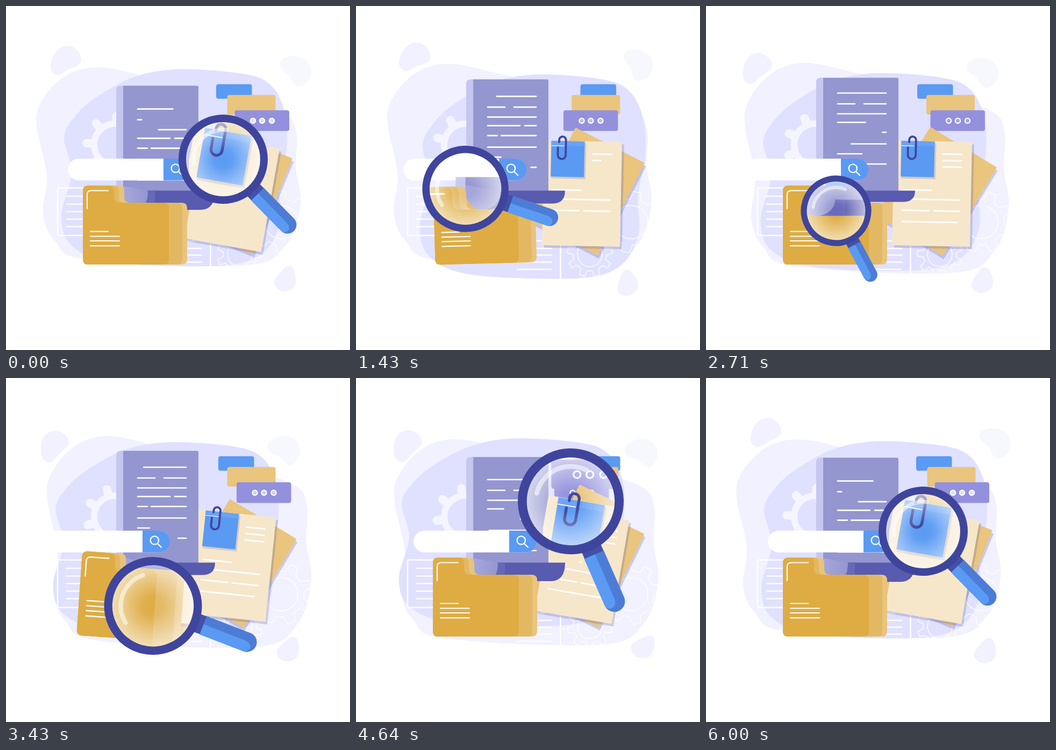
An HTML page for the animation above (6.07 s loop, 640x640 px).

```html
<!DOCTYPE html>
<html lang="en">
<head>
<meta charset="utf-8">
<title>Document search</title>
<style>
html, body { margin: 0; height: 100%; overflow: hidden; background: #fff; }
svg { display: block; width: 100vw; height: 100vh; }
.pen { fill: none; stroke: #fff; stroke-linecap: round; stroke-linejoin: round; }
</style>
</head>
<body>
<svg viewBox="0 0 640 640">
  <defs>
    <clipPath id="lens"><circle id="lensHole"/></clipPath>
    <radialGradient id="haze">
      <stop offset="0" stop-color="#fff" stop-opacity="0"/>
      <stop offset=".25" stop-color="#fff" stop-opacity=".04"/>
      <stop offset="1" stop-color="#fff" stop-opacity=".6"/>
    </radialGradient>
    <linearGradient id="rollFill">
      <stop offset="0" stop-color="#a5a7dc"/><stop offset="1" stop-color="#9496d0"/>
    </linearGradient>
  </defs>

  <path id="pale" fill="#f1f1ff"/>
  <path id="tint" fill="#e0e1ff"/>
  <path id="dropA" fill="#f1f1ff" d="M-16 27C-32 23-28 5-26 0C-20-19-8-27 3-27C18-27 30-13 29 0C28 10 13 13 3 18C-4 21-9 28-16 27Z"/>
  <path id="dropB" fill="#f6f8fd" d="M-30-12C-28-26-13-28-1-28C19-27 29-14 29 0C29 16 15 28 7 28C-3 27-5 16-11 9C-19 2-31-2-30-12Z"/>
  <path id="dropC" fill="#f1f1ff" d="M-21 4C-22-5-7-13 0-17C8-23 18-25 21-15C23-5 22 10 13 18C3 24-17 24-21 4Z"/>

  <g class="pen" stroke-width="2.6" opacity=".95">
    <path d="M200 338.500H98Q96 338.500 96 341V424Q96 427 99 427H200M113 354H160M113 368.500H160M113 382.500H160M113 396.500H160M113 410.500H160"/>
    <path d="M380.500 400V509M300 437H351M300 451H364M300 463.500H364M300 476.500H364M300 490H363"/>
  </g>
  <g id="gearA" fill="none" stroke="#f5f5ff" stroke-linecap="round"><circle r="39" stroke-width="12"/></g>
  <g class="pen" stroke-width="2" opacity=".7">
    <g id="gearB"><circle r="31"/></g>
    <g id="gearC"><circle r="23"/></g>
  </g>

  <g id="scene">
    <rect id="cardA" y="145.500" width="66.500" height="27" rx="4" fill="#5a9af3"/>
    <rect id="cardB" y="165.500" width="90" height="36.500" rx="4" fill="#e9c57d"/>
    <g id="cardC">
      <rect y="194" width="101.500" height="38.500" rx="4" fill="#9391dd"/>
      <g id="dots" fill="#fff" stroke="#fff" stroke-width="2.200">
        <circle cx="34" cy="213.500" r="4.600"/><circle cx="51" cy="213.500" r="4.600"/><circle cx="69" cy="213.500" r="4.600"/>
      </g>
    </g>

    <g id="backSheet">
      <rect x="-68" y="-92" width="145" height="193" rx="2" fill="#6667b5" opacity=".28"/>
      <rect x="-72.500" y="-96.500" width="145" height="193" rx="2" fill="#e9c57d"/>
    </g>
    <g id="sheet">
      <rect x="-68.500" y="-93" width="145" height="195" rx="1" fill="#6667b5" opacity=".28"/>
      <rect x="-72.500" y="-97.500" width="145" height="195" rx="1" fill="#f6e7cb"/>
      <rect x="-58" y="-94" width="64" height="67" fill="#8a83a8" opacity=".3"/>
      <rect x="-59" y="-97" width="62" height="66.500" rx="1" fill="#5a9af3"/>
      <rect x="-59" y="-97" width="62" height="9" fill="#6aa3f5"/>
      <path class="pen" d="M-58-88H-35" stroke-width="1.200"/>
      <path d="M-46.500-85V-71A7.300 7.300 0 0 0-31.800-71V-99A6.300 6.300 0 0 0-44.400-99V-95" fill="none" stroke="#3f459d" stroke-width="3.800" stroke-linecap="round"/>
      <g id="sheetLines" class="pen" stroke-width="2.700"></g>
    </g>

    <path id="strip" fill="#c6c7ef"/>
    <path id="page" fill="#9496d0"/>
    <g id="pageLines" class="pen" stroke-width="2.700"></g>
    <path id="roll" fill="#595bb0"/>
    <path id="rollShade" fill="#6668ba"/>
    <path id="curl" fill="url(#rollFill)"/>

    <g id="bar">
      <rect x="76" y="284" width="229" height="40.500" rx="20.200" fill="#fff"/>
      <path d="M254 284H285A20.200 20.200 0 0 1 285 324.500H254Z" fill="#5a9af3"/>
      <g class="pen" stroke-width="2.300"><circle cx="276.300" cy="302" r="7.700"/><path d="M282 308L289 315"/></g>
    </g>

    <g id="folder">
      <g id="folds"></g>
      <path class="pen" stroke-width="2.200" d="M151 377V351Q151 343.500 158 343.500H190M157 419.500H190M157 428.500H211M157 437H211M157 446.200H211"/>
    </g>
  </g>

  <g clip-path="url(#lens)"><use id="zoom" href="#scene"/></g>
  <g id="glass">
    <circle r="84" fill="url(#haze)"/>
    <path id="shine" class="pen" stroke-width="9" opacity=".55"/>
    <path d="M96-19.500H113V19.500H96Z" fill="#4350a6"/>
    <path d="M110-20H206A20 20 0 0 1 206 20H110Z" fill="#4d7cd6"/>
    <path d="M110-2H202Q214-1 216 8Q216 15 211 19.400Q209 20 206 20H110Z" fill="#5a9af3"/>
    <circle r="91.500" fill="none" stroke="#3f459d" stroke-width="17"/>
  </g>
</svg>

<script>
const LOOP = 6070, FRAMES = 86, END = FRAMES - 1;
const TIMES = [0, 11, 29, 38, 48, 65, END];   // key pose times, last equals first
const TRIM = 5.4;                             // frames to erase or draw a line

// Background outlines, clockwise from the top
const PALE = [[180,116], [270,135], [420,170], [515,200], [538,235], [537,300], [546,365], [520,440], [440,479],
  [150,468], [90,435], [67,385], [74,315], [56,230], [58,190], [85,150], [125,123]];
const TINT = [[320,114], [440,123], [490,145], [515,195], [518,260], [505,330], [505,400], [470,455], [390,476],
  [200,470], [120,440], [99,385], [118,305], [104,240], [125,200], [165,165], [235,128]];

// Text rows, top to bottom and in writing order: y, then x spans
const PAGE_ROWS = [
  [163, 245, 335], [183, 245, 277, 294, 335], [201.5, 245, 335], [217.5, 245, 305, 314, 335],
  [236, 245, 263, 270, 335], [257.5, 245, 335], [276, 245, 290], [295, 245, 335]
];
const SHEET_ROWS = [
  [-6, -55, -2], [-74, 19, 54], [11, -55, 52], [32, -55, -5, 4, 52],
  [-62, 19, 54], [-50, 19, 54], [53, -55, 47]
];

const $ = id => document.getElementById(id);
const set = (id, attrs) => {
  for (const k in attrs) $(id).setAttribute(k, attrs[k]);
};
const addPath = (parent, d = '', fill) => {
  const p = document.createElementNS('http://www.w3.org/2000/svg', 'path');
  p.setAttribute('d', d);
  if (fill) p.setAttribute('fill', fill);
  return $(parent).appendChild(p);
};
const clamp = (x, lo, hi) => Math.min(hi, Math.max(lo, x));
const mod = (x, n) => (x % n + n) % n;
const polar = (r, deg) => [r * Math.cos(deg * Math.PI / 180), r * Math.sin(deg * Math.PI / 180)];
const place = (x, y, turn = 0) => ({ transform: `translate(${x} ${y}) rotate(${turn})` });

// Periodic Hermite curve through six poses
function tween(v, u) {
  const i = TIMES.findIndex((t, k) => u < TIMES[k + 1]), j = (i + 1) % 6;
  const span = k => TIMES[k + 1] - TIMES[k];
  const slope = k => (v[(k + 1) % 6] - v[(k + 5) % 6]) / (span(k) + span((k + 5) % 6));
  const h = span(i), s = (u - TIMES[i]) / h, s2 = s * s, s3 = s2 * s;
  return (2*s3 - 3*s2 + 1) * v[i] + (3*s2 - 2*s3) * v[j]
    + h * ((s3 - 2*s2 + s) * slope(i) + (s3 - s2) * slope(j));
}

// Smooth closed outline, shifted sideways and stretched between top and bottom
function blob(ring, dx, dyTop, dyBottom) {
  const pts = ring.map(([x, y]) => [x + dx, y + dyTop + (dyBottom - dyTop) * (y - 115) / 365]);
  const pt = i => pts[mod(i, pts.length)];
  return 'M' + pt(0) + pts.map((b, i) => {
    const a = pt(i - 1), e = pt(i + 1), f = pt(i + 2);
    const c1 = b.map((x, k) => x + (e[k] - a[k]) / 6), c2 = e.map((x, k) => x - (f[k] - b[k]) / 6);
    return `C${c1} ${c2} ${e}`;
  }).join('') + 'Z';
}

// Phase 0 to 1 erases a row from the left, 1 to 2 draws it again
const pagePhase = (i, u) => clamp(mod(u - 19 - 3.5 * i, END / 3) / TRIM, 0, 2);
function sheetPhase(i, u) {
  const erase = 60 + 1.8 * i, write = 3 + 3.7 * i;
  return u < erase ? 1 + clamp((u - write) / TRIM, 0, 1) : clamp((u - erase) / TRIM, 0, 1);
}

function trim([y, ...xs], phase, dy) {
  const x0 = xs[0], w = xs[xs.length - 1] - x0;
  const from = x0 + w * (phase < 1 ? phase : 0), to = x0 + w * (phase < 1 ? 1 : phase - 1);
  let d = '';
  for (let i = 0; i < xs.length; i += 2) {
    const a = Math.max(from, xs[i]), b = Math.min(to, xs[i + 1]);
    if (b > a) d += `M${a} ${y + dy}H${b}`;
  }
  return d;
}

function cog(n, root, tip) {
  const pts = [];
  for (let i = 0; i < n; i++)
    for (const [r, f] of [[root, -.3], [tip, -.17], [tip, .17], [root, .3]])
      pts.push(polar(r, (i + f) * 360 / n));
  return 'M' + pts.join('L') + 'Z';
}

const fold = (w, t) => `M143 344Q143 334 153 334H${t - 9}Q${t} 334 ${t} 345V355Q${t} 366 ${t + 11} 366`
  + `H${w - 10}Q${w} 366 ${w} 376V471Q${w} 481 ${w - 10} 481H153Q143 481 143 471Z`;

[[337, 220, '#e8c47c'], [328, 210, '#e3b863'], [303, 201, '#deac43']]
  .forEach(([w, t, fill]) => addPath('folds', fold(w, t), fill));
for (let a = 0; a < 360; a += 45)
  addPath('gearA', `M${polar(44, a)}L${polar(53, a)}`).setAttribute('stroke-width', 16);
addPath('gearB', cog(8, 43, 57));
addPath('gearC', cog(9, 31, 42));
const pagePaths = PAGE_ROWS.map(() => addPath('pageLines'));
const sheetPaths = SHEET_ROWS.map(() => addPath('sheetLines'));
set('shine', { d: `M${polar(66, 127)}A66 66 0 0 1 ${polar(66, 231)}` });

function drawBackground(u) {
  const wave = peak => Math.cos(2 * Math.PI * (u - peak) / END);
  const late = wave(64), mid = wave(51);

  set('pale', { d: blob(PALE, 11 + 11 * mid, -5 - 5 * wave(33), 12 + 10 * mid) });
  set('tint', { d: blob(TINT, -20 * wave(61), 6 - 8 * wave(68), 8 - 23 * late) });
  set('dropA', place(101 - 12 * mid, 111 + 18 * wave(56), -8 - 14 * wave(56)));
  set('dropB', place(527 - 12 * wave(38), 126 + 16 * wave(60), -17 * wave(60)));
  set('dropC', place(518 + 15 * late, 509 - 9 * late, -17 + 23 * late));

  const spin = 45 * u / END;
  set('gearA', place(203, 258, spin + 3));
  set('gearB', place(512, 402, spin));
  set('gearC', place(435, 462, -spin * 8 / 9));
  set('backSheet', place(429, 345, 27 + 4.5 * wave(41)));
}

function drawObjects(u, at) {
  set('cardA', { x: at(391, 414, 414, 393, 395, 425) });
  set('cardB', { x: at(411.5, 405, 400, 410, 411.5, 398) });
  set('cardC', place(at(425.5, 411, 370.5, 417.5, 429, 369), 0));
  set('dots', { 'fill-opacity': clamp(at(.7, 0, .85, .15, .55, 0), 0, 1) });
  set('sheet', place(420.5, 349, at(10.1, 4.1, -.6, 1.2, 5.9, 9.7)));
  SHEET_ROWS.forEach((row, i) => sheetPaths[i].setAttribute('d', trim(row, sheetPhase(i, u), 0)));

  // The page rises and drops; its text travels twice as far
  const drop = at(14.3, 6.2, 0, -.5, 1.5, 13), top = 134 + drop, end = 365 + drop;
  set('strip', { d: `M222 ${top}H213Q205 ${top} 205 ${top + 8}V345H222Z` });
  set('page', { d: `M218 345V${top}H355Q358 ${top} 358 ${top + 3}V345Z` });
  set('roll', { d: `M240 ${end}V343.500H389Q389 ${end} ${366 - drop * .3} ${end}Z` });
  set('rollShade', { d: `M262 343.500H277V${end}H250Z` });
  set('curl', { d: `M218 335V343C218 ${end - 10} 228 ${end} 240 ${end}C254 ${end} 264 ${end - 10} 264 343.500Z` });
  PAGE_ROWS.forEach((row, i) => pagePaths[i].setAttribute('d', trim(row, pagePhase(i, u), drop * 2)));

  set('bar', place(at(39, 25.7, 0, -3, 0, 31), 0));

  // The folder grows as it tilts
  const tilt = at(0, -2.7, 0, 0, 4, 0);
  set('folder', { transform: `translate(240 408) rotate(${tilt}) scale(${1 + tilt * .0172}) translate(-240 -408)` });
}

function drawLens(at) {
  const x = at(404, 276.5, 162.5, 242, 273.5, 399.5), y = at(285, 231, 449, 381, 424, 229.5);
  const r = at(83, 100.5, 58, 65.5, 91, 98.5), turn = at(45.5, 28.2, 19, 61.8, 21.1, 66.4);
  const fx = at(401, 320, 215, 322, 380, 383), fy = at(284, 264, 403, 302, 397, 296);
  set('lensHole', { cx: x, cy: y, r: r * .86 });
  set('zoom', { transform: `translate(${fx} ${fy}) scale(1.41) translate(${-fx} ${-fy})` });
  set('glass', { transform: `translate(${x} ${y}) rotate(${turn}) scale(${r / 100})` });
}

function tick(now) {
  const u = Math.floor(now % LOOP / LOOP * FRAMES) % END;
  const at = (...poses) => tween(poses, u);
  drawBackground(u);
  drawObjects(u, at);
  drawLens(at);
  requestAnimationFrame(tick);
}
tick(0);
</script>
</body>
</html>
```
